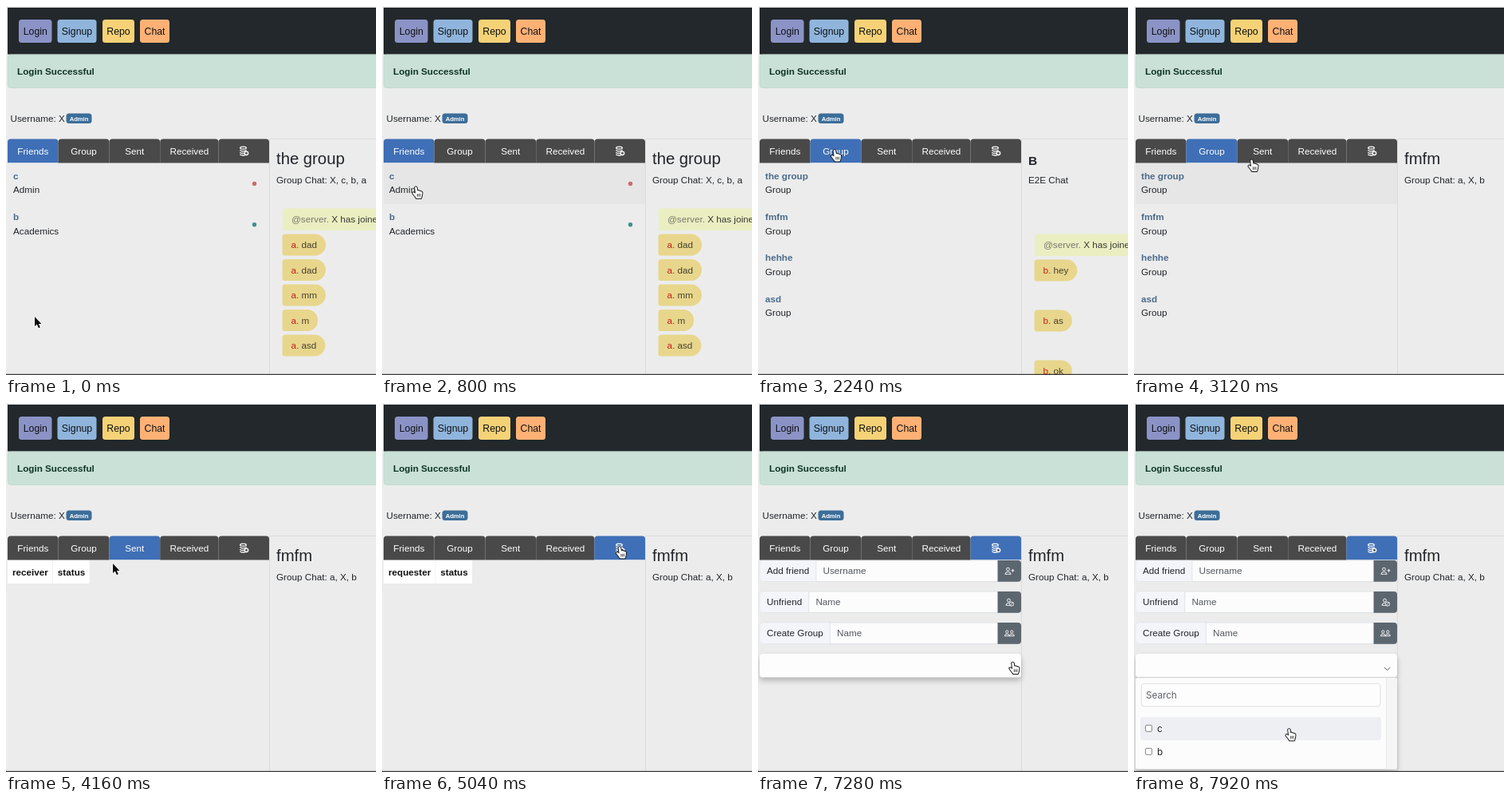
These frames come from a looping animation (464x462 px, 8 s). An HTML page with a canvas:

```html
<!DOCTYPE html>
<html lang="en">
<head>
<meta charset="utf-8">
<title>Chat dashboard</title>
<style>
html, body { margin: 0; width: 100%; height: 100%; overflow: hidden; background: #ececec; }
canvas { display: block; width: 464px; height: 462px; }
</style>
</head>
<body>
<canvas id="stage"></canvas>
<script>
const W = 464, H = 462, LOOP = 8000, STEP = 80;
const canvas = document.getElementById('stage');
const ctx = canvas.getContext('2d');
const ratio = window.devicePixelRatio || 1;
canvas.width = W * ratio;
canvas.height = H * ratio;

const SANS = '"Liberation Sans", Arial, sans-serif';
const UI = 'Inter, "Noto Sans", sans-serif';
const SIZE = 11.7, ROW = 51.2;

const TABS = ['Friends', 'Group', 'Sent', 'Received', ''];
const TAB_X = [2, 65.5, 129.5, 193.2, 266.5, 330];
const FRIENDS = [['c', 'Admin', '#c96c6b'], ['b', 'Academics', '#41908a']];
const GROUPS = ['the group', 'fmfm', 'hehhe', 'asd'].map(name => [name, 'Group']);

const CHATS = {
  group: { title: 'the group', sub: 'Group Chat: X, c, b, a', top: 253.5, gap: 31.5,
    from: 'a.', lines: ['dad', 'dad', 'mm', 'm', 'asd'] },
  c: { title: 'C', small: true, sub: 'E2E Chat', top: 285.5, gap: 63,
    from: 'c.', lines: ['Hey', 'as', 'hey'], smile: true },
  b: { title: 'B', small: true, sub: 'E2E Chat', top: 285.5, gap: 63,
    from: 'b.', lines: ['hey', 'as', 'ok'] },
  fmfm: { title: 'fmfm', sub: 'Group Chat: a, X, b', lines: [] }
};

// Each entry: start time, value
const CHAT_AT = [[0, 'group'], [880, 'c'], [1680, 'b'], [2720, 'fmfm']];
const TAB_AT = [[0, 0], [2240, 1], [3600, 2], [4640, 3], [5040, 4]];
const PANEL_AT = [[0, 0], [2240, 1], [3600, 2], [4640, 3], [5120, 4]];
const OPEN_AT = [[0, false], [7440, true]];

// Pointer path: time, x, y
const PATH = [
  [0, 36, 389], [240, 36, 389], [720, 42, 226], [960, 44, 227], [1280, 47.5, 244],
  [1520, 48, 268], [1760, 48, 268], [2160, 96, 180], [2320, 96, 180], [2640, 48, 265],
  [2800, 48, 266], [3120, 147.5, 192.5], [3360, 158, 180], [3680, 158, 180],
  [4160, 134, 201], [4320, 140, 200], [4640, 226, 181], [4800, 228, 181],
  [5040, 298, 180], [5200, 298, 180], [5680, 269, 206.5], [5920, 269, 208],
  [6400, 272, 286], [6800, 319.5, 324.5], [7440, 319.5, 324.5], [7920, 194.5, 408]
];

const current = (list, t) => list.filter(item => item[0] <= t).pop()[1];

function pointerAt(t) {
  const i = PATH.findIndex(p => p[0] > t);
  if (i < 0) return PATH[PATH.length - 1].slice(1);
  const [t0, x0, y0] = PATH[i - 1], [t1, x1, y1] = PATH[i];
  const u = (t - t0) / (t1 - t0), e = u * u * (3 - 2 * u);
  return [x0 + (x1 - x0) * e, y0 + (y1 - y0) * e];
}

function pointerKind(x, y, panel) {
  if (y < 166) return 'arrow';
  if (y < 197) return 'hand';
  if (panel < 2) return y < 197 + ROW * (panel ? 4 : 2) ? 'hand' : 'arrow';
  if (panel < 4) return 'arrow';
  if (y >= 314) return 'hand';
  return x < 300 && (y - 197) % 39 < 27 ? 'beam' : 'arrow';
}

function box(x, y, w, h, fill, r = 0, stroke) {
  ctx.beginPath();
  ctx.roundRect(x, y, w, h, r);
  if (fill) { ctx.fillStyle = fill; ctx.fill(); }
  if (stroke) { ctx.strokeStyle = stroke; ctx.lineWidth = 0.8; ctx.stroke(); }
}

// Returns the x where the text ends.
function text(str, x, y, color = '#212529', size = SIZE, weight = 'normal', family = SANS) {
  ctx.font = `${weight} ${size}px ${family}`;
  ctx.fillStyle = color;
  ctx.fillText(str, x, y);
  return x + ctx.measureText(str).width;
}

function circle(x, y, r, fill, stroke) {
  ctx.beginPath();
  ctx.arc(x, y, r, 0, 7);
  if (fill) { ctx.fillStyle = fill; ctx.fill(); }
  if (stroke) { ctx.strokeStyle = stroke; ctx.stroke(); }
}

function line(points, color, width = 1) {
  ctx.beginPath();
  points.forEach(p => ctx.lineTo(p[0], p[1]));
  ctx.strokeStyle = color;
  ctx.lineWidth = width;
  ctx.stroke();
}

function drawHeader() {
  box(2, 2, W, 58.5, '#22282b');
  const buttons = [['Login', 16, 41.5, '#8b93c6'], ['Signup', 64.5, 49, '#90b5dc'],
    ['Repo', 121, 40, '#f6d277'], ['Chat', 168, 37, '#ffb175']];
  ctx.textAlign = 'center';
  for (const [name, x, w, fill] of buttons) {
    box(x, 17, w, 29, fill, 3.5);
    text(name, x + w / 2, 36, '#101214', 12.3);
  }
  ctx.textAlign = 'left';
  box(2.4, 61, W + 5, 41.5, '#cae1d7', 3.5, '#bcd8cb');
  text('Login Successful', 14, 86, '#0d3525', SIZE, 'bold');
  text('Username: X', 5.5, 145, '#212529');
  box(75.5, 134.5, 32, 12.5, '#3c6e99', 3.5);
  text('Admin', 79.7, 143.6, '#fff', 7.6, 'bold');
}

function databaseIcon(x, y) {
  ctx.strokeStyle = '#fff';
  ctx.lineWidth = 1.3;
  for (let i = 0; i < 4; i++) {
    ctx.beginPath();
    ctx.ellipse(x - 1, y - 3.8 + i * 2.6, 3.8, 1.5, 0, 0, i ? Math.PI : 7);
    ctx.stroke();
  }
  circle(x + 3, y + 2.8, 2.2, '#555', '#fff');
}

function drawTabs(active) {
  ctx.textAlign = 'center';
  TABS.forEach((name, i) => {
    const x = TAB_X[i], w = TAB_X[i + 1] - x;
    box(x, 166.5, w, 30, i === active ? '#3f6fb6' : '#494949', [4, 4, 0, 0]);
    if (i === active) line([[x, 196.5], [x + w, 196.5]], '#dfe5ee', 0.7);
    if (name) text(name, x + w / 2, 186, '#fff');
  });
  ctx.textAlign = 'left';
  databaseIcon(298.5, 181.5);
}

function drawList(rows, hover) {
  rows.forEach(([name, note, dot], i) => {
    const y = 197 + i * ROW;
    if (i === hover) box(2, y, 328, ROW, '#e6e6e6');
    text(name, 9, y + 20, '#4a6b8c', SIZE, 'bold');
    text(note, 9, y + 37.4);
    if (dot) circle(311.5, y + 25.5, 2.7, dot);
  });
}

function drawTable(heads) {
  let x = 2;
  for (const head of heads) {
    const end = text(head, x + 6, 216, '#111', SIZE, 'bold');
    box(x, 197, end + 5.4 - x, 29, '#fff');
    text(head, x + 6, 216, '#111', SIZE, 'bold');
    x = end + 6;
  }
}

function person(x, y, s = 1) {
  circle(x, y - 2.2 * s, 1.9 * s, null, '#fff');
  ctx.beginPath();
  ctx.moveTo(x - 3.6 * s, y + 4 * s);
  ctx.quadraticCurveTo(x - 3.4 * s, y + 1 * s, x, y + 1 * s);
  ctx.quadraticCurveTo(x + 3.4 * s, y + 1 * s, x + 3.6 * s, y + 4 * s);
  ctx.closePath();
  ctx.stroke();
}

const FIELD_ICONS = [
  y => {
    person(313.5, y);
    line([[317.5, y - 0.5], [321.5, y - 0.5]], '#fff', 0.9);
    line([[319.5, y - 2.5], [319.5, y + 1.5]], '#fff', 0.9);
  },
  y => {
    person(314.5, y);
    circle(318, y + 2.3, 2.6, '#5c666f', '#fff');
    line([[316.3, y + 4], [319.8, y + 0.5]], '#fff', 0.8);
  },
  y => { person(312.3, y, 0.85); person(318.3, y, 0.85); }
];

function drawForm() {
  const fields = [['Add friend', 'Username'], ['Unfriend', 'Name'], ['Create Group', 'Name']];
  fields.forEach(([label, hint], i) => {
    const y = 197 + i * 39;
    box(2.4, y, 327, 26.5, '#fcfcfd', 4, '#d9dcdf');
    const end = text(label, 11, y + 17.3) + 8.6;
    box(2.4, y + 0.3, end - 2.4, 26, '#f3f5fa', [4, 0, 0, 4]);
    line([[end, y], [end, y + 26.5]], '#dcdfe3', 0.8);
    text(label, 11, y + 17.3);
    text(hint, end + 8.6, y + 17.3, '#53585d');
    box(300.5, y, 29.5, 26.7, '#5c666f', [0, 4, 4, 0]);
    ctx.lineWidth = 0.9;
    FIELD_ICONS[i](y + 13.3);
  });
}

function drawSelect(open, y) {
  ctx.save();
  ctx.shadowColor = 'rgba(0,0,0,.24)';
  ctx.shadowBlur = 7 * ratio;
  ctx.shadowOffsetY = 4 * ratio;
  box(2, 314, 328, 29.5, '#fdfdfd', 4);
  if (open) box(2, 344, 328, 114.5, '#fcfcfc', 3);
  ctx.restore();
  line([[314, 331.2], [317.6, 334.6], [321.2, 331.2]], '#555', 1);
  if (!open) return;
  line([[2, 343.8], [330, 343.8]], '#d4d4d4', 0.9);
  box(316.5, 344.5, 13, 114, '#f5f5f5');
  line([[316.5, 344.5], [316.5, 458.5]], '#e4e4e4', 0.8);
  box(9.4, 351.4, 299.5, 28.5, '#fdfdfd', 3, '#d6d9dc');
  text('Search', 15, 370, '#5b6066', SIZE, 'normal', UI);
  ['c', 'b'].forEach((name, i) => {
    const top = 393.3 + i * 29;
    if (y >= top && y < top + 29) box(8, top, 302, 29, '#eeeff3', 3.5);
    box(14.4, top + 10, 8, 8, '#fff', 1.5, '#666');
    text(name, 29, top + 18.8, '#212529', SIZE, 'normal', UI);
  });
}

function smiley(x, y) {
  circle(x, y, 5.7, '#efb343');
  circle(x - 2.1, y - 1.6, 1.1, '#70451d');
  circle(x + 2.1, y - 1.6, 1.1, '#70451d');
  ctx.beginPath();
  ctx.arc(x, y + 0.6, 3.6, 0, Math.PI);
  ctx.fillStyle = '#7b4a26';
  ctx.fill();
  box(x - 2.8, y + 0.7, 5.6, 1.3, '#fff');
}

function drawChat(chat) {
  line([[330, 166.5], [W, 166.5]], '#dbdbdb', 1);
  line([[330.5, 166.5], [330.5, H]], '#dcdcdc', 1);
  if (chat.small) text(chat.title, 339, 198.5, '#212529', 15.5, 'bold');
  else text(chat.title, 339, 198, '#212529', 20.3);
  text(chat.sub, 339, 222);
  if (!chat.lines.length) return;

  box(347, chat.top, 150, 27.5, '#ebeec1', 3);
  const x = text('@server. ', 358, chat.top + 17.8, '#77786a');
  text('X has joined the chat', x, chat.top + 17.8, '#393b32');

  chat.lines.forEach((msg, i) => {
    const y = chat.top + 32 + i * chat.gap;
    const smile = chat.smile && i === 0;
    const str = ' ' + msg + (smile ? ' ' : '');
    ctx.font = `${SIZE}px ${SANS}`;
    const w = ctx.measureText(chat.from + str).width + (smile ? 12 : 0);
    box(346.5, y, w + 22, 27, '#e8d68c', [4, 13.5, 13.5, 3]);
    const mid = text(chat.from, 357.5, y + 17.6, '#c8201c');
    const end = text(str, mid, y + 17.6, '#45412f');
    if (smile) smiley(end + 6, y + 13.3);
  });
}

function paint(path, fill, stroke, width) {
  ctx.lineJoin = 'round';
  ctx.lineWidth = width;
  ctx.strokeStyle = stroke;
  ctx.stroke(path);
  ctx.fillStyle = fill;
  ctx.fill(path);
}

const ARROW = new Path2D('M0 0V12L2.8 9.6L4.9 14.2L6.9 13.3L4.9 8.9H8.5Z');
const HAND = new Path2D('M-1.4 1Q0 -.8 1.2 1L1.9 5.2Q3.3 4.2 4 5.6Q5.4 4.8 6 6.2Q7.8 5.6 8 7.4' +
  'L7.6 11L6.6 14.6H.6L-1.2 12L-4 8.4Q-4.2 6.6 -2.4 7.2L-.4 8.6Z');

function drawPointer(x, y, kind) {
  ctx.save();
  ctx.translate(x, y);
  if (kind === 'arrow') paint(ARROW, '#0c0c0c', '#fff', 1.6);
  if (kind === 'hand') {
    paint(HAND, '#fff', '#151515', 1.9);
    for (const k of [1.8, 3.6, 5.4]) line([[k, 8.8], [k + 0.1, 12.4]], '#222', 0.8);
  }
  if (kind === 'beam') {
    for (const [color, width] of [['#fff', 2.4], ['#151515', 1.2]]) {
      line([[-3, -7], [-1, -7], [0, -6], [1, -7], [3, -7]], color, width);
      line([[0, -6], [0, 6]], color, width);
      line([[-3, 7], [-1, 7], [0, 6], [1, 7], [3, 7]], color, width);
      line([[-1.8, 2.6], [1.8, 2.6]], color, width * 0.8);
    }
  }
  ctx.restore();
}

function draw(t) {
  const panel = current(PANEL_AT, t);
  const [x, y] = pointerAt(t);
  const hover = Math.floor((y + 4.6 - 197) / 51.7);

  ctx.setTransform(ratio, 0, 0, ratio, 0, 0);
  box(0, 0, W, H, '#ececec');
  drawHeader();
  drawChat(CHATS[current(CHAT_AT, t)]);
  if (panel === 0) drawList(FRIENDS, hover);
  if (panel === 1) drawList(GROUPS, hover);
  if (panel === 2) drawTable(['receiver', 'status']);
  if (panel === 3) drawTable(['requester', 'status']);
  if (panel === 4) {
    drawForm();
    drawSelect(current(OPEN_AT, t), y);
  }
  drawTabs(current(TAB_AT, t));
  box(0, H - 1.2, W, 1.2, '#3a3a3a');
  drawPointer(x, y, pointerKind(x, y, panel));
}

const start = performance.now();
function frame() {
  const t = (performance.now() - start) % LOOP;
  draw(Math.floor(t / STEP) * STEP);
  requestAnimationFrame(frame);
}
frame();
</script>
</body>
</html>
```
